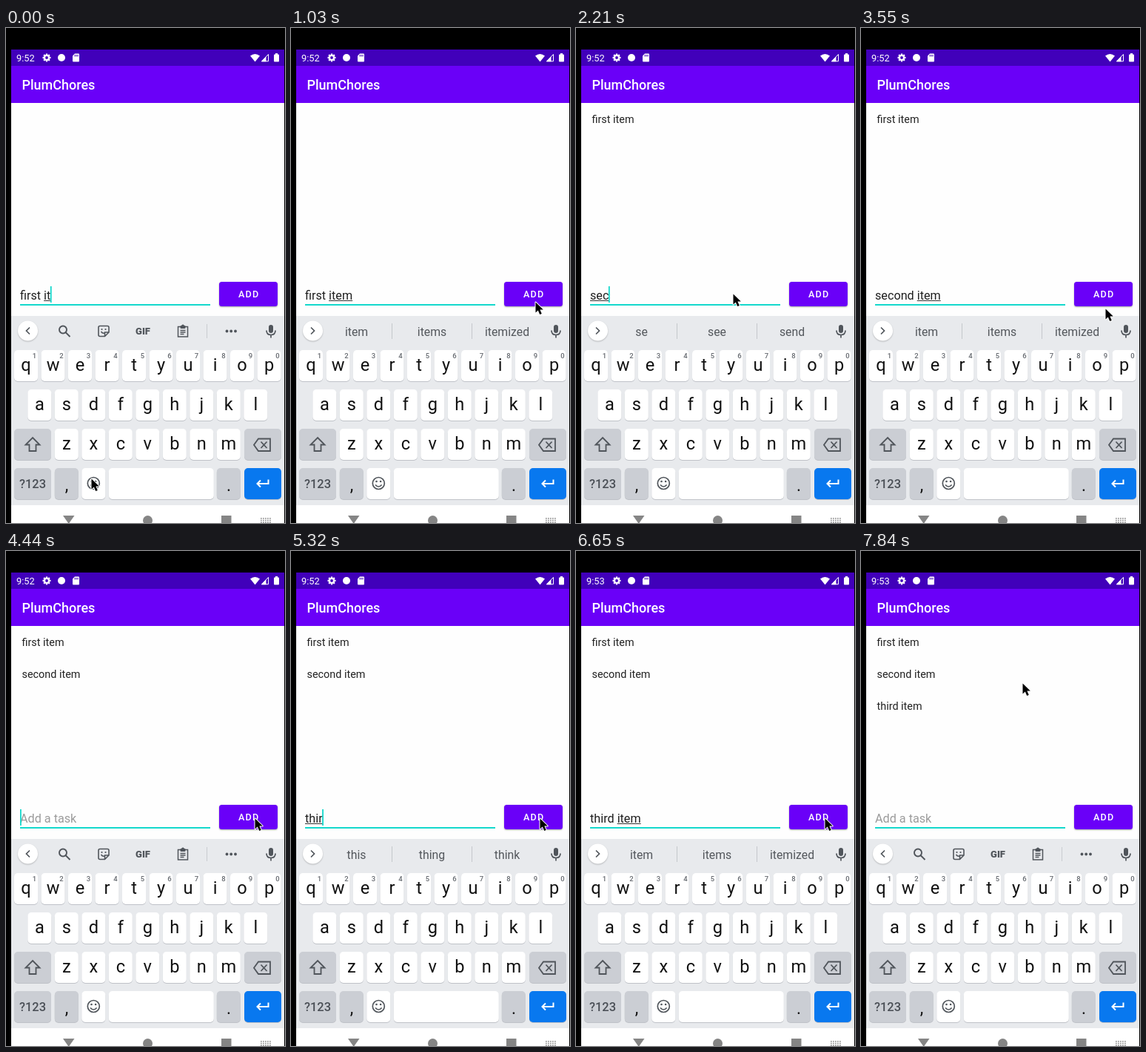
Animation of 377 by 667 pixels, one loop 8 s. Source, as an HTML page with a canvas:

```html
<!DOCTYPE html>
<html lang="en">
<head>
<meta charset="utf-8">
<title>Task list</title>
<style>
html, body { margin: 0; width: 100%; height: 100%; overflow: hidden; background: #000; }
canvas { display: block; width: 377px; height: 667px; }
</style>
</head>
<body>
<canvas id="stage"></canvas>
<script>
const W = 377, H = 667, LOOP = 8000;
const canvas = document.getElementById('stage');
const ctx = canvas.getContext('2d');
const dpr = window.devicePixelRatio || 1;
canvas.width = W * dpr;
canvas.height = H * dpr;

const PURPLE = '#6a00f8', TEAL = '#14d8cc', ICON = '#50555b', KEYBOARD = '#e8eaed';
const ITEMS = ['first item', 'second item', 'third item'];
const ITEM_WORDS = 'item items itemized', IT_WORDS = "it it's item";

// Each step lists only what changes; values hold until the next step.
const steps = [
  [0, { text: 'first it', words: '', caret: true, mouse: [115, 607], items: 0, press: 0, clock: '9:52' }],
  [150, { text: 'first ite', words: IT_WORDS }],
  [300, { text: 'first item' }],
  [440, { words: ITEM_WORDS, mouse: [122, 590] }],
  [590, { mouse: [172, 507] }],
  [740, { mouse: [264, 392] }],
  [890, { mouse: [322, 345], caret: false }],
  [1030, { mouse: [330, 369] }],
  [1180, { mouse: [331, 367], press: 1 }],
  [1320, { text: '', words: '', items: 1, caret: true, press: 0.5 }],
  [1470, { press: 0, mouse: [306, 364] }],
  [1620, { mouse: [235, 358] }],
  [1760, { mouse: [212, 358], caret: false }],
  [2060, { text: 'se', caret: true }],
  [2210, { text: 'sec', words: 'se see send' }],
  [2360, { text: 'seco', words: 'sec second secret' }],
  [2500, { text: 'second', words: 'second seconds sec' }],
  [2650, { text: 'second ', words: '' }],
  [2800, { text: 'second i' }],
  [2950, { text: 'second ite', words: IT_WORDS }],
  [3100, { text: 'second item', words: ITEM_WORDS }],
  [3550, { mouse: [330, 378], caret: false }],
  [3700, { mouse: [335, 364] }],
  [3840, { mouse: [336, 360] }],
  [3990, { press: 1 }],
  [4140, { text: '', words: '', items: 2, caret: true, press: 0.5 }],
  [4290, { press: 0 }],
  [4590, { caret: false }],
  [4730, { text: 't', caret: true }],
  [4880, { text: 'th', words: 'the to that' }],
  [5170, { text: 'thi', words: 'the this that' }],
  [5320, { text: 'thir', words: 'this thing think' }],
  [5470, { text: 'third', words: 'third thirty thirst' }],
  [5610, { text: 'third it', words: 'third thirds this' }],
  [5760, { text: 'third item', words: IT_WORDS, lag: 1 }],
  [6060, { words: ITEM_WORDS, lag: 0 }],
  [6360, { caret: false }],
  [6650, { clock: '9:53' }],
  [6800, { caret: true }],
  [6950, { press: 1 }],
  [7100, { text: '', words: '', items: 3, press: 0.5 }],
  [7240, { press: 0, mouse: [282, 272] }],
  [7390, { mouse: [216, 184] }],
  [7690, { caret: false }],
  [7840, { mouse: [218, 178] }]
];

function stateAt(t) {
  const state = {};
  for (const [start, change] of steps) if (start <= t) Object.assign(state, change);
  return state;
}

function rect(x, y, w, h, fill) {
  ctx.fillStyle = fill;
  ctx.fillRect(x, y, w, h);
}

function round(x, y, w, h, r, fill) {
  ctx.fillStyle = fill;
  ctx.beginPath();
  ctx.roundRect(x, y, w, h, r);
  ctx.fill();
}

function disc(x, y, r, fill) {
  ctx.fillStyle = fill;
  ctx.beginPath();
  ctx.arc(x, y, r, 0, Math.PI * 2);
  ctx.fill();
}

function label(str, x, y, size, fill, align = 'left', weight = 400) {
  ctx.font = `${weight} ${size}px Roboto, sans-serif`;
  ctx.textAlign = align;
  ctx.fillStyle = fill;
  ctx.fillText(str, x, y);
}

function line(path, color = ICON, width = 1.7) {
  ctx.strokeStyle = color;
  ctx.lineWidth = width;
  ctx.stroke(new Path2D(path));
}

function solid(path, color) {
  ctx.fillStyle = color;
  ctx.fill(new Path2D(path));
}

function shadow(blur, dy, alpha) {
  ctx.shadowColor = `rgba(0,0,0,${alpha})`;
  ctx.shadowBlur = blur * dpr;
  ctx.shadowOffsetY = dy * dpr;
}

function drawStatusBar(clock) {
  rect(7, 29, 369, 22, '#4100ba');
  label(clock, 14, 45, 12.8, '#fff');
  for (let i = 0; i < 8; i++) {
    const a = i * Math.PI / 4, c = Math.cos(a), s = Math.sin(a);
    line(`M${55 + 3 * c} ${40 + 3 * s}L${55 + 5.5 * c} ${40 + 5.5 * s}`, '#fff', 2.3);
  }
  ctx.strokeStyle = '#fff';
  ctx.lineWidth = 2.2;
  ctx.beginPath();
  ctx.arc(55, 40, 3, 0, Math.PI * 2);
  ctx.stroke();
  disc(75, 40, 5, '#fff');
  solid('M93 34.5H98Q99 34.5 99 35.5V44.500Q99 45.500 98 45.500H91Q90 45.500 90 44.500V37.500Z', '#fff');
  for (const x of [93, 95, 97]) rect(x - 0.4, 36, 1, 2.5, '#4100ba');
  solid('M330 37.5Q336.500 32.500 343 37.500L336.500 45.500Z', '#fff');
  line('M345.500 44.800H354.500V35.500Z', '#fff', 1);
  solid('M345 45.300L351.500 38.500V45.300Z', '#fff');
  round(362, 35.500, 7, 10, 1, '#fff');
  rect(364, 34, 3, 2, '#fff');
}

function drawButton(press) {
  shadow(2 + 3 * press, 1 + press, 0.35);
  round(288, 342, 79, 33, 3.500, PURPLE);
  shadow(0, 0, 0);
  if (press) round(288, 342, 79, 33, 3.500, `rgba(255,255,255,${0.22 * press})`);
  ctx.letterSpacing = '1.15px';
  label('ADD', 314, 363, 12.6, '#fff', 'left', 500);
  ctx.letterSpacing = '0px';
}

function drawField({ text, caret, lag }) {
  const x = 19, size = 16.2;
  rect(x, 372, 257, 2, TEAL);
  label(text || 'Add a task', x, 365.500, size, text ? '#1f1f1f' : '#9b9b9b');
  const width = str => ctx.measureText(str).width;
  const wordStart = text.lastIndexOf(' ') + 1;
  if (text.length > wordStart) {
    const from = width(text.slice(0, wordStart));
    const to = width(text.slice(0, text.length - (lag || 0)));
    rect(x + from, 367, to - from, 1, '#333');
  }
  if (caret) rect(x + (text ? width(text) - 0.5 : 0), 348, 1.800, 22, TEAL);
}

function drawStrip(words) {
  shadow(2, 1, 0.22);
  disc(29.500, 408, 13.500, '#fff');
  shadow(0, 0, 0);
  line(words ? 'M27 403.500L31.500 408L27 412.500' : 'M32 403.500L27.500 408L32 412.500');
  if (words) {
    words.split(' ').forEach((word, i) => label(word, [88.500, 190.500, 292][i], 414.500, 15.8, '#53575c', 'center'));
    rect(136, 398, 1, 21, '#c4c7cb');
    rect(244, 398, 1, 21, '#c4c7cb');
  } else {
    line('M82 406.500A5 5 0 1 1 72 406.500A5 5 0 1 1 82 406.500M80.700 410.300L86.500 416', ICON, 1.900);
    line('M127 401.500H137Q139 401.500 139 403.500V410L133.500 415.500H127Q125 415.500 125 413.500V403.500Q125 401.500 127 401.500ZM133.500 415V410H139M128.500 409Q130.500 412 133 411', ICON, 1.600);
    disc(129.500, 406, 1.100, ICON);
    disc(134.500, 406, 1.100, ICON);
    label('GIF', 185, 413, 13, ICON, 'center', 900);
    line('M232.500 402.500H245.500V416H232.500ZM235.500 407.500H242.500M235.500 410H242.500M235.500 412.500H240.500', ICON, 1.500);
    round(235.500, 401, 7, 4, 1, ICON);
    disc(239, 401.500, 1.900, ICON);
    rect(271, 399, 1, 19, '#c9ccd0');
    for (const x of [298.500, 304.200, 310]) disc(x, 408.500, 1.900, ICON);
  }
  round(355, 400, 6, 11, 3, ICON);
  line('M352 407.500Q352 413.500 358 413.500Q364 413.500 364 407.500M358 413.500V417.500', ICON, 1.700);
}

function key(x, y, w, fill = '#fff') {
  round(x, y + 1, w, 42, 5, '#bfc2c8');
  round(x, y, w, 42, 5, fill);
}

function drawKeyRow(letters, x0, y, digits) {
  [...letters].forEach((letter, i) => {
    const x = x0 + i * 36.500;
    key(x, y, 32);
    label(letter, x + 16, y + 28, 23.6, '#111', 'center');
    if (digits) label((i + 1) % 10, x + 27.500, y + 11, 9.5, '#666a70', 'center', 500);
  });
}

function drawKeys() {
  const grey = '#cbced4';
  drawKeyRow('qwertyuiop', 11, 434, true);
  drawKeyRow('asdfghjkl', 29.300, 487);
  drawKeyRow('zxcvbnm', 65.800, 540);
  key(11, 540, 50, grey);
  key(322, 540, 50, grey);
  line('M36 552L45.500 561.500H40.500V570H31.500V561.500H26.500Z', ICON, 1.800);
  line('M341 553.500H357V570H341L335 561.700ZM344.500 557.500L352.500 566M352.500 557.500L344.500 566', ICON, 1.800);
  key(11, 593, 50, grey);
  key(65.800, 593, 32, grey);
  key(102.300, 593, 32);
  key(138.800, 593, 142);
  key(284.800, 593, 32, grey);
  key(322, 593, 50, '#0878ef');
  label('?123', 36, 619.500, 16.4, '#4b5057', 'center', 500);
  label(',', 82, 624, 23, '#111', 'center');
  label('.', 301, 624, 23, '#111', 'center');
  line('M126.300 613.500A8 8 0 1 1 110.300 613.500A8 8 0 1 1 126.300 613.500M114 615.500Q118.300 620.500 122.600 615.500', ICON, 1.700);
  disc(115.500, 611, 1.300, ICON);
  disc(121.100, 611, 1.300, ICON);
  line('M354.500 608.500V614H340M344 609.500L339.500 614L344 618.500', '#fff', 2);
}

function drawNavBar() {
  const grey = '#858585';
  rect(7, 643, 369, 24, '#fff');
  solid('M77 657H92.500L84.700 668Z', grey);
  disc(191.500, 663.500, 6.500, grey);
  rect(291, 657, 13.500, 10, grey);
  for (let row = 0; row < 3; row++)
    for (let col = 0; col < 5; col++) rect(344 + col * 3, 660 + row * 2.700, 1.800, 1.600, '#999');
}

function drawMouse([x, y]) {
  ctx.save();
  ctx.translate(x, y);
  const arrow = new Path2D('M0.500 0.500V14.500L3.800 11.600L6.200 17L8.800 15.900L6.400 10.600H10.800Z');
  ctx.lineJoin = 'round';
  ctx.strokeStyle = '#fff';
  ctx.lineWidth = 2;
  ctx.stroke(arrow);
  ctx.fillStyle = '#000';
  ctx.fill(arrow);
  ctx.restore();
}

function draw(t) {
  const state = stateAt(t);
  ctx.setTransform(dpr, 0, 0, dpr, 0, 0);
  rect(0, 0, W, H, '#000');
  rect(7, 51, 369, 592, '#fefefe');
  rect(7, 51, 369, 50, PURPLE);
  drawStatusBar(state.clock);
  label('PlumChores', 21.500, 82.500, 18, '#fff', 'left', 500);
  ITEMS.slice(0, state.items).forEach((item, i) => label(item, 21.500, 128 + i * 43.200, 14.4, '#222'));
  drawField(state);
  drawButton(state.press);
  rect(7, 388, 369, 255, KEYBOARD);
  drawStrip(state.words);
  drawKeys();
  drawNavBar();
  drawMouse(state.mouse);
}

const begin = performance.now();
function tick() {
  draw((performance.now() - begin) % LOOP);
  requestAnimationFrame(tick);
}
tick();
</script>
</body>
</html>
```
